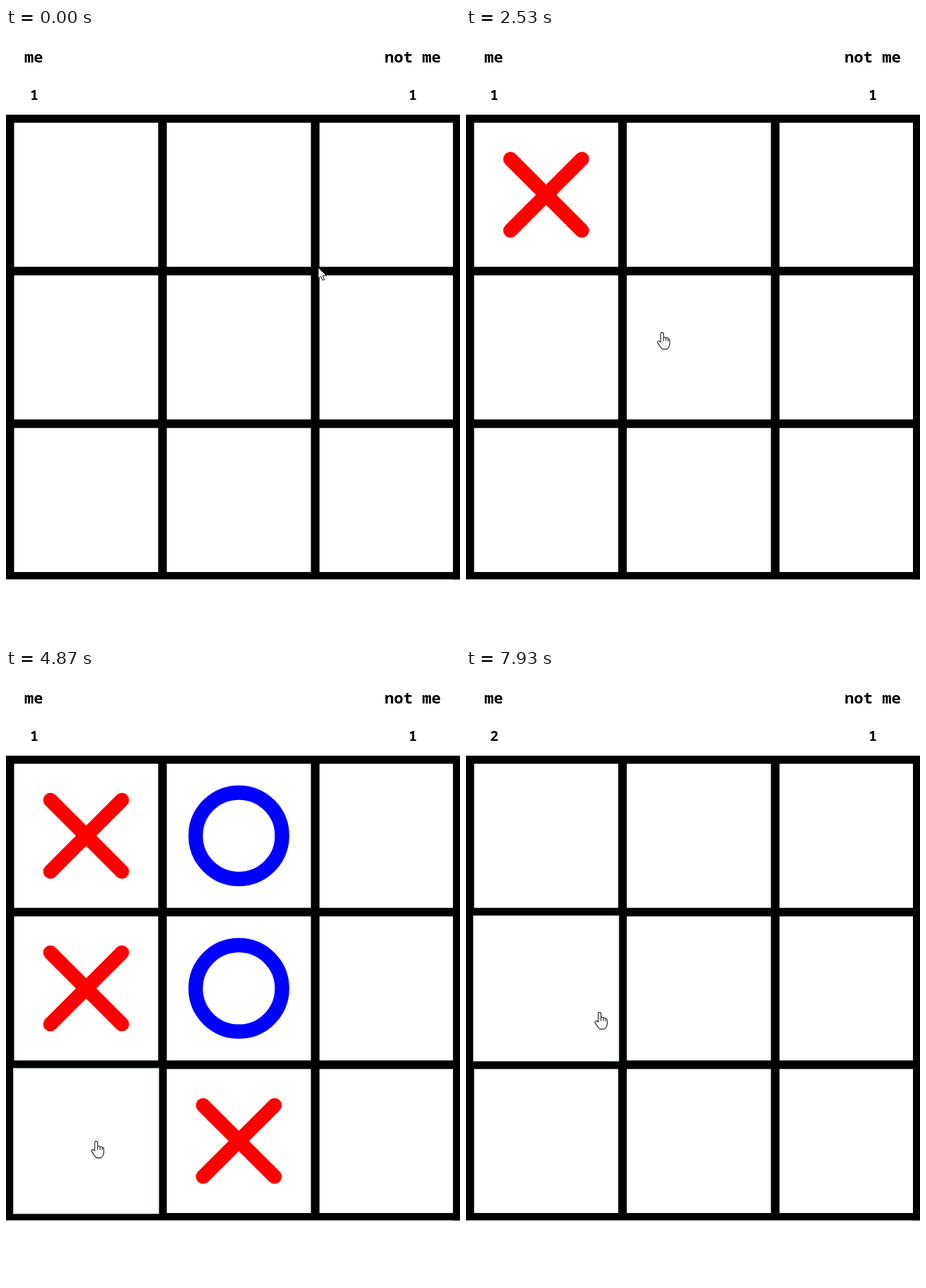
Write an HTML page that moves like this. It is 644 by 870 pixels and loops after 8 s.

```html
<!DOCTYPE html>
<html lang="en">
<head>
<meta charset="utf-8">
<title>Noughts and crosses</title>
<style>
  html, body { margin: 0; width: 100%; height: 100%; overflow: hidden; background: #fff; }
  svg { display: block; width: 644px; height: 870px; }
  text { font-family: "Noto Sans Mono", "DejaVu Sans Mono", monospace; font-weight: 700; }
</style>
</head>
<body>
<svg viewBox="0 0 644 870">
  <g font-size="22.2">
    <text x="26" y="49">me</text>
    <text x="537" y="49">not me</text>
  </g>
  <g font-size="19.5" text-anchor="middle">
    <text id="score" x="40" y="102">1</text>
    <text x="577" y="102">1</text>
  </g>
  <rect y="123" width="644" height="659.5"/>
  <g id="cells" fill="#fff"></g>
  <g id="marks" fill="none" stroke-width="20.5" stroke-linecap="round"></g>
  <rect x="634" y="123" width="10" height="659.5"/>
  <g id="result">
    <text x="15" y="826" font-size="28" style="font-weight: 600" fill="#008000">Winner : me</text>
    <rect x="526.5" y="799.5" width="101" height="48" fill="#ffd700" stroke="#000" stroke-width="3"/>
    <text x="577" y="830" font-size="19" style="font-weight: 600" text-anchor="middle" fill="#f00">Again</text>
  </g>
  <g id="cursor" fill="#fff" stroke-linejoin="round" stroke-linecap="round">
    <path id="arrow" stroke="#000" d="M0 0V15.5L3.6 12.2L6.2 18L8.8 17L6.3 11.3H11Z"/>
    <path id="hand" stroke="#1c1c2c" stroke-width="1.1"
      d="M-2 14V1.5Q0 -1 2 1.5V8Q4 6 5.4 8.2Q7.6 7 8.5 9.2Q10.8 9 10.8 11.5V17Q10.5 20 8 23L6.5 24H.5L-1.5 22L-6.6 14.5Q-6.6 11.5 -4 12.4ZM2 8V12M5.4 8.2V12M8.5 9.2V12.5"/>
  </g>
</svg>
<script>
const LOOP = 8000, FPS = 15, GLIDE = 320, RESET = 7670;
const PITCH = 216.6, SIZE = 204.4, CENTER_X = 113.7, CENTER_Y = 236.7, RIGHT = 634;

// Where the pointer rests, in cell units, and when it plays and leaves
const stops = [
  { leave: 80, col: 1.52, row: 0.477 },
  { leave: 800, col: 0, row: 0, mark: "X" },
  { leave: 1670, col: 0.24, row: 1.02 },
  { leave: 2000, col: 0, row: 0 },
  { leave: 2340, col: 0.9, row: 0 },
  { leave: 2670, col: 0.68, row: 1.41, mark: "O" },
  { leave: 3270, col: 0, row: 1, mark: "X" },
  { leave: 3730, col: 1, row: 0, mark: "O" },
  { leave: 4600, col: 1, row: 2, mark: "X" },
  { leave: 5130, col: 0, row: 2, mark: "O" },
  { leave: 5730, col: 1.89, row: 1.02, mark: "X" },
  { leave: 6130, col: 2, row: 0, mark: "O" },
  { leave: 6680, col: 2, row: 2 },
  { leave: 7000, col: 2.09, row: 2.587 },
  { leave: 7590, col: 2.12, row: 2.65 },
  { leave: LOOP, col: 0.35, row: 1.156 }
];
const moves = stops.filter(stop => stop.mark);
const winTime = moves[moves.length - 1].leave;

const $ = id => document.getElementById(id);
const show = (el, on) => el.setAttribute("visibility", on ? "visible" : "hidden");
const add = (parent, tag, attrs) => {
  const el = document.createElementNS("http://www.w3.org/2000/svg", tag);
  for (const name in attrs) el.setAttribute(name, attrs[name]);
  return parent.appendChild(el);
};
const toStage = (col, row) => [CENTER_X + col * PITCH, CENTER_Y + row * PITCH];

function addSquare(index, grow, attrs) {
  const [x, y] = toStage(index % 3, Math.floor(index / 3));
  const size = SIZE + 2 * grow;
  return add($("cells"), "rect", { x: x - size / 2, y: y - size / 2, width: size, height: size, ...attrs });
}

const highlights = Array.from({ length: 9 }, (_, i) => {
  addSquare(i, 0);
  return addSquare(i, 0.8, { stroke: "#d4f0f2" });
});

const marks = moves.map(({ col, row, mark }) => {
  const transform = `translate(${toStage(Math.round(col), Math.round(row))})`;
  return mark === "O"
    ? add($("marks"), "circle", { r: 61.3, stroke: "#00f", transform })
    : add($("marks"), "path", { d: "M-50.7 -50.7L50.7 50.7M50.7 -50.7L-50.7 50.7", stroke: "#f00", transform });
});

// Glide from the previous stop, then rest until it is time to leave
function pointerAt(t) {
  const i = stops.findIndex(stop => t <= stop.leave);
  const to = stops[i], from = stops[Math.max(i - 1, 0)];
  const u = Math.min(Math.max((t - from.leave) / GLIDE, 0), 1);
  const ease = u * u * (3 - 2 * u);
  const mix = key => from[key] + (to[key] - from[key]) * ease;
  return toStage(mix("col"), mix("row"));
}

function cellAt([px, py]) {
  return highlights.findIndex((_, i) => {
    const [x, y] = toStage(i % 3, Math.floor(i / 3));
    return px < RIGHT && Math.max(Math.abs(px - x), Math.abs(py - y)) <= SIZE / 2;
  });
}

// Time advances in 15 steps a second, rounded to 10 ms
const stepTime = step => Math.round(Math.max(step, 0) * 100 / FPS) * 10;

function draw(time) {
  const step = Math.floor((time % LOOP + 4) * FPS / 1000);
  const t = stepTime(step);
  const tip = pointerAt(t);
  const overCell = cellAt(tip) >= 0;
  const hovered = cellAt(pointerAt(stepTime(step - 1))); // highlight trails by one step

  highlights.forEach((square, i) => show(square, i === hovered));
  marks.forEach((mark, i) => show(mark, t >= moves[i].leave && t < RESET));
  show($("result"), t >= winTime && t < RESET);
  $("score").textContent = t >= winTime ? 2 : 1;
  $("cursor").setAttribute("transform", `translate(${tip})`);
  show($("hand"), overCell);
  show($("arrow"), !overCell);
}

const start = performance.now();
function tick() {
  draw(performance.now() - start);
  requestAnimationFrame(tick);
}
tick();
</script>
</body>
</html>
```
